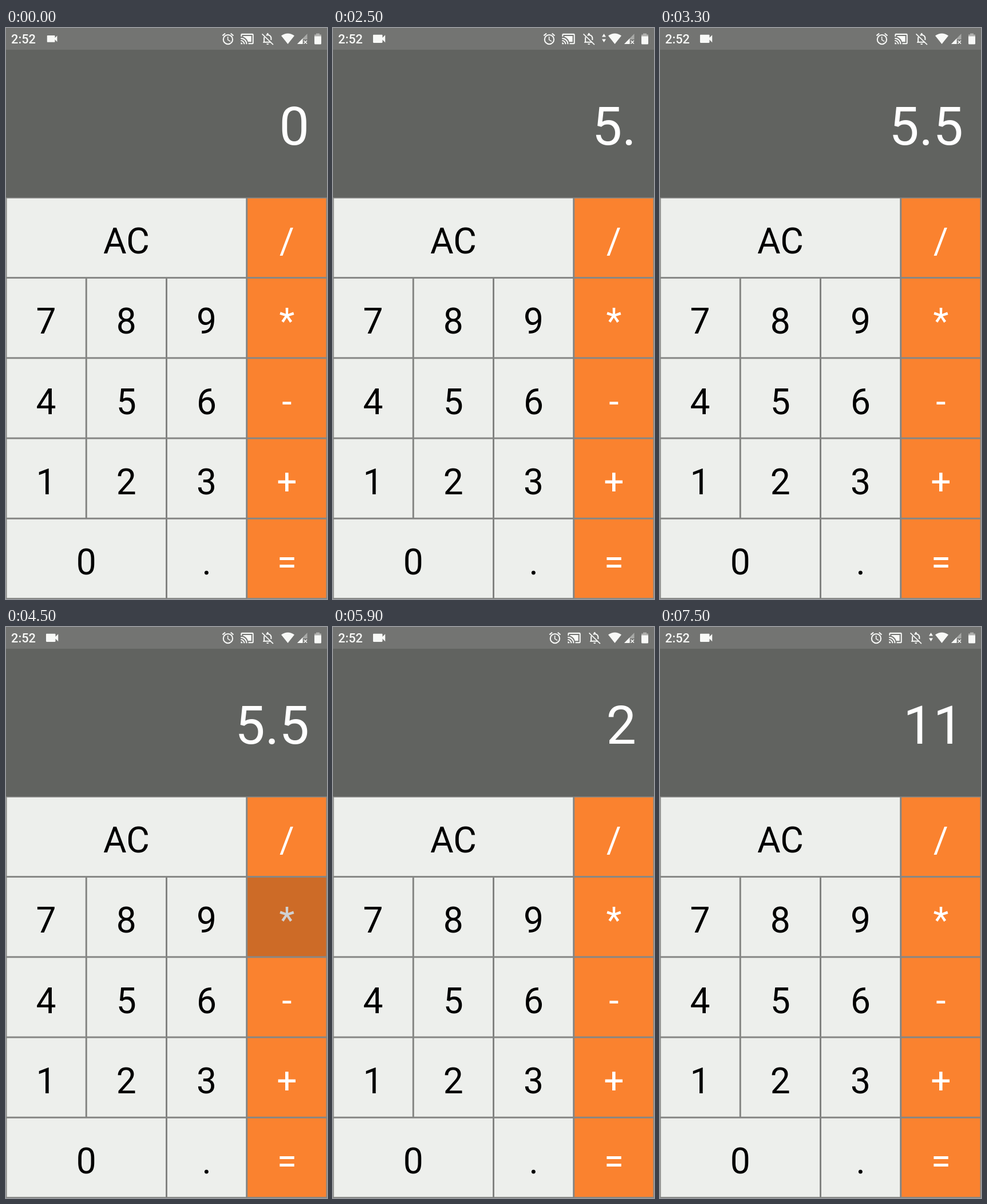
An HTML page that plays this animation: 561x998 px, repeating every 8000 ms.

```html
<!DOCTYPE html>
<html lang="en">
<head>
<meta charset="utf-8">
<title>Calculator</title>
<style>
  html, body { margin: 0; width: 100%; height: 100%; overflow: hidden; background: #616360; }
  svg { display: block; width: 100vw; height: 100vh; }
  text { font-family: Roboto, sans-serif; }
  .key { font-size: 62.3px; text-anchor: middle; }
</style>
</head>
<body>
<svg viewBox="0 0 561 998">
  <rect width="561" height="998" fill="#616360"/>
  <rect width="561" height="38" fill="#737472"/>

  <g id="status" fill="#f8f9f7">
    <text x="9" y="27" font-size="21.8" font-weight="500">2:52</text>
    <g id="camera">
      <path transform="translate(-12 -12)" d="M17 10.5V7c0-.55-.45-1-1-1H4c-.55 0-1 .45-1 1v10c0 .55.45 1 1 1h12c.55 0 1-.45 1-1v-3.5l4 4v-11l-4 4z"/>
    </g>
    <g id="notices">
      <path transform="translate(375.7 6.8) scale(1.02)" d="M22 5.72l-4.6-3.86-1.29 1.53 4.6 3.86zM7.88 3.39L6.6 1.86 2 5.71l1.29 1.53zM12.5 8H11v6l4.75 2.85.75-1.23-4-2.37zM12 4a9 9 0 1 0 0 18a9 9 0 0 0 0-18zm0 16a7 7 0 1 1 0-14a7 7 0 0 1 0 14z" fill-rule="evenodd"/>
      <path transform="translate(409.3 6.8) scale(1.02)" d="M1 18v3h3a3 3 0 0 0-3-3zm0-4v2a5 5 0 0 1 5 5h2a7 7 0 0 0-7-7zm18-7H5v1.63A13 13 0 0 1 13.37 17H19zM1 10v2a9 9 0 0 1 9 9h2A11 11 0 0 0 1 10zm20-7H3a2 2 0 0 0-2 2v3h2V5h18v14h-7v2h7a2 2 0 0 0 2-2V5a2 2 0 0 0-2-2z"/>
      <g transform="translate(445 6.8) scale(1.02)">
        <path d="M6.5 8.5Q6 10 6 11.500V17.500H17.500M9.500 6Q11 5 12 5Q18 5.500 18 11.500V14" fill="none" stroke="#f8f9f7" stroke-width="2"/>
        <path d="M4 18.500v-1l2-2v3zM10.500 5V3.500a1.500 1.500 0 0 1 3 0V5zM10 20h4a2 2 0 0 1-4 0z"/>
        <path d="M2.500 3.500L21.500 21.800" stroke="#f8f9f7" stroke-width="1.700"/>
      </g>
    </g>
    <path id="traffic" d="M470 15.500L473.500 10L477 15.500zM470 19.500H477L473.500 25z"/>
    <path d="M481 13.500Q492.500 5.500 504 13.500L492.500 28z"/>
    <path d="M526.500 10V20H519V28H509z" opacity=".4"/>
    <path d="M518.500 18.300V28H509z"/>
    <path d="M520.500 22L526 27.500M526 22L520.500 27.500" stroke="#f8f9f7" stroke-width="1.600"/>
    <path d="M539 15V11.500H542V9.500H548V11.500H551V15z" opacity=".45"/>
    <path d="M539 14.500H551V27a1.500 1.500 0 0 1-1.500 1.500H540.500a1.500 1.500 0 0 1-1.500-1.500z"/>
  </g>

  <text id="display" x="530" y="204.300" font-size="93.500" text-anchor="end" fill="#fff"></text>
  <g id="keys"></g>
</svg>
<script>
const LOOP = 8000, STEP = 100;
const CELL = 140.25, TOP = 296.3, BORDER = 1.5;
const $ = id => document.getElementById(id);

// Each row lists [label, columns spanned].
const ROWS = [
  [['AC', 3], ['/', 1]],
  [['7', 1], ['8', 1], ['9', 1], ['*', 1]],
  [['4', 1], ['5', 1], ['6', 1], ['-', 1]],
  [['1', 1], ['2', 1], ['3', 1], ['+', 1]],
  [['0', 2], ['.', 1], ['=', 1]]
];
const DISPLAY = [[0, '0'], [1900, '5'], [2300, '5.'], [3200, '5.5'], [5800, '2'], [6900, '11']];
const TRAFFIC = [[0, false], [2400, true], [3200, false], [7400, true]];
const PRESSES = [
  { key: '5', start: 3100, length: 200, shade: 0.1 },
  { key: '*', start: 4500, length: 400, shade: 0.18 }
];

function add(name, attrs, text = '') {
  const node = document.createElementNS('http://www.w3.org/2000/svg', name);
  for (const key in attrs) node.setAttribute(key, attrs[key]);
  node.textContent = text;
  return $('keys').appendChild(node);
}

function addKey(label, col, row, span) {
  const operator = col === 3;
  const x = col * CELL, y = TOP + row * CELL, width = span * CELL;
  const inner = {
    x: x + BORDER, y: y + BORDER,
    width: width - 2 * BORDER, height: CELL - 2 * BORDER
  };
  add('rect', { x, y, width, height: CELL + 1, fill: '#868785' });
  add('rect', { ...inner, fill: operator ? '#fa822f' : '#edefec' });
  add('text', { class: 'key', x: x + width / 2, y: 394 + row * CELL, fill: operator ? '#fff' : '#000' }, label);
  return add('rect', { ...inner, fill: '#000', opacity: 0 });
}

const shades = {};
ROWS.forEach((row, r) => {
  let col = 0;
  for (const [label, span] of row) {
    shades[label] = addKey(label, col, r, span);
    col += span;
  }
});

const valueAt = (track, t) => track.filter(([start]) => start <= t).pop()[1];

function render(t) {
  $('display').textContent = valueAt(DISPLAY, t);

  const busy = valueAt(TRAFFIC, t);
  $('notices').setAttribute('transform', `translate(${busy ? -10 : 0} 0)`);
  $('traffic').setAttribute('opacity', busy ? 1 : 0);

  const size = 0.98 + 0.2 * Math.min(t / 500, 1);
  $('camera').setAttribute('transform', `translate(80.6 18.8) scale(${size})`);

  for (const { key, start, length, shade } of PRESSES) {
    const age = (t - start) / length;
    shades[key].setAttribute('opacity', age >= 0 && age < 1 ? shade * (1 - age) : 0);
  }
}

const origin = performance.now();
function tick() {
  const t = (performance.now() - origin) % LOOP;
  render(Math.floor(t / STEP) * STEP);
  requestAnimationFrame(tick);
}
tick();
</script>
</body>
</html>
```
